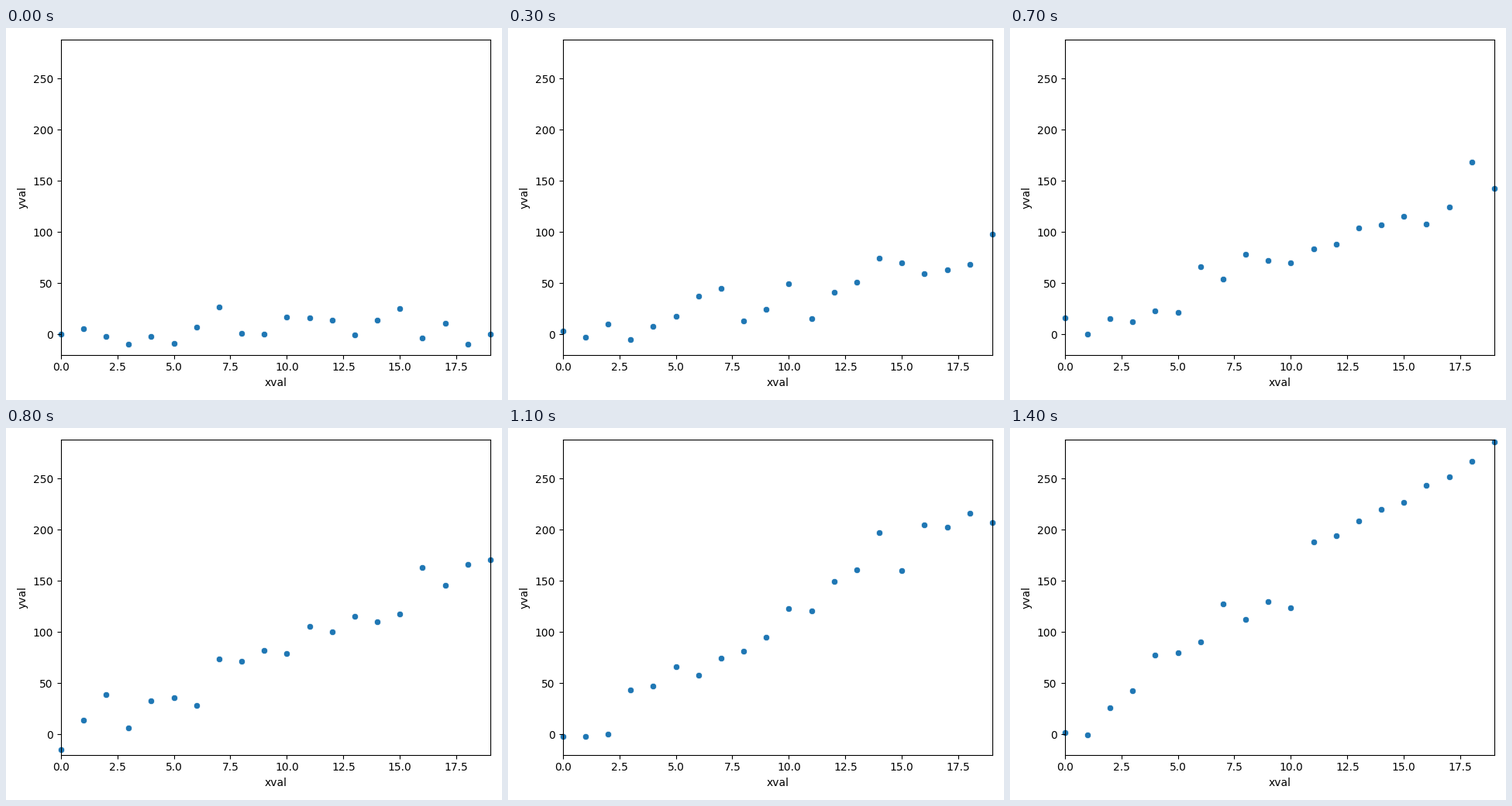
A matplotlib script for the animation above (1500 ms loop, 640 by 480 pixels).

```python
import numpy as np
import matplotlib.pyplot as plt
from matplotlib.animation import FuncAnimation

STEPS = 15
INTERVAL = 100
SPREAD = 14.5
Y_LIM = (-20.2, 288.1)

x = np.arange(20)
noise = np.random.default_rng(7).normal(0, SPREAD, (STEPS, x.size))


def series(step):
    """Noisy line through the origin that gets one unit steeper per step."""
    return np.clip((step + 1) * x + noise[step], *Y_LIM)


fig, ax = plt.subplots(figsize=(6.4, 4.8), dpi=100)
ax.set(xlim=(x[0], x[-1]), ylim=Y_LIM, xlabel="xval", ylabel="yval")
fig.tight_layout()

# Dots on the border stay whole, so clipping is off.
dots = ax.scatter(x, series(0), s=36, color="#1f77b4", edgecolor="white",
                  linewidth=0.48, clip_on=False)


def update(step):
    dots.set_offsets(np.column_stack([x, series(step)]))
    return [dots]


anim = FuncAnimation(fig, update, frames=STEPS, interval=INTERVAL,
                     repeat=True, repeat_delay=0)
plt.show()
```
